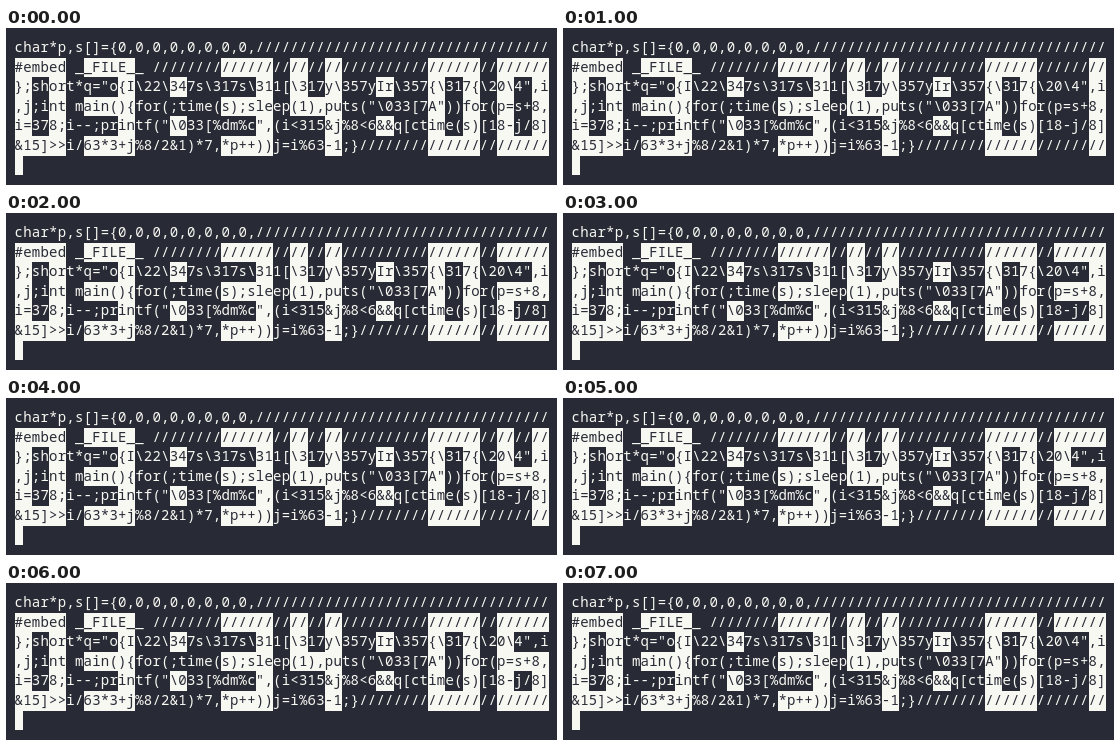
These frames come from a looping animation (551 by 157 pixels, 8000 ms). An HTML page:

```html
<!DOCTYPE html>
<html lang="en">
<head>
<meta charset="utf-8">
<title>Terminal clock</title>
<style>
html, body { margin: 0; width: 100%; height: 100%; overflow: hidden; background: #282a36; }
svg { display: block; }
text {
  font: 14px "Noto Sans Mono", "DejaVu Sans Mono", monospace;
  letter-spacing: 0.2154px;
  font-variant-ligatures: none;
  white-space: pre;
}
.light { fill: #f8f8f2; }
.dark { fill: #282a36; }
</style>
</head>
<body>
<svg width="551" height="157" viewBox="0 0 551 157">
  <defs><clipPath id="clip"><path id="mask"/></clipPath></defs>
  <g id="plain" class="light"></g>
  <path id="cells" class="light"/>
  <g id="inverse" class="dark" clip-path="url(#clip)"></g>
</svg>
<script>
const COLS = 62, CELL_W = 14 * 1200 / 1950, CELL_H = 19.6;
const LOOP = 8000;

const lines = [
  String.raw`char*p,s[]={0,0,0,0,0,0,0,0,`,
  String.raw`#embed __FILE__ `,
  String.raw`};short*q="o{I\22\347s\317s\311[\317y\357yIr\357{\317{\20\4",i`,
  String.raw`,j;int main(){for(;time(s);sleep(1),puts("\033[7A"))for(p=s+8,`,
  String.raw`i=378;i--;printf("\033[%dm%c",(i<315&j%8<6&&q[ctime(s)[18-j/8]`,
  String.raw`&15]>>i/63*3+j%8/2&1)*7,*p++))j=i%63-1;}`
].map(s => s.padEnd(COLS, "/"));

// 3x5 glyphs for 0-9 and colon; bit 0 is the bottom right cell
const glyphs = [0x7b6f, 0x1249, 0x73e7, 0x73cf, 0x5bc9, 0x79cf,
                0x79ef, 0x7249, 0x7bef, 0x7bcf, 0x0410];

const $ = id => document.getElementById(id);
const colX = c => Math.round((c + 1) * CELL_W);
const rowY = r => Math.round(10 + r * CELL_H);

function box(c, r, n) {
  return `M${colX(c)} ${rowY(r)}H${colX(c + n)}V${rowY(r + 1)}H${colX(c)}Z`;
}

function addLines(group) {
  lines.forEach((line, r) => {
    const el = document.createElementNS("http://www.w3.org/2000/svg", "text");
    el.setAttribute("x", CELL_W);
    el.setAttribute("y", rowY(r) + 14);
    el.textContent = line;
    group.append(el);
  });
}

function clockPath(time) {
  let d = box(0, 6, 1); // cursor
  [...time].forEach((ch, k) => {
    const bits = glyphs[ch.charCodeAt(0) & 15];
    for (let r = 0; r < 5; r++)
      for (let c = 0; c < 3; c++)
        if (bits >> (4 - r) * 3 + 2 - c & 1) d += box(k * 8 + c * 2, r + 1, 2);
  });
  return d;
}

let shown = -1;
function draw(ms) {
  const sec = Math.floor(ms % LOOP / 1000);
  if (sec === shown) return;
  shown = sec;
  const d = clockPath("03:34:0" + sec);
  $("cells").setAttribute("d", d);
  $("mask").setAttribute("d", d);
}

addLines($("plain"));
addLines($("inverse"));
const start = performance.now();
function tick() {
  draw(performance.now() - start);
  requestAnimationFrame(tick);
}
tick();
</script>
</body>
</html>
```
